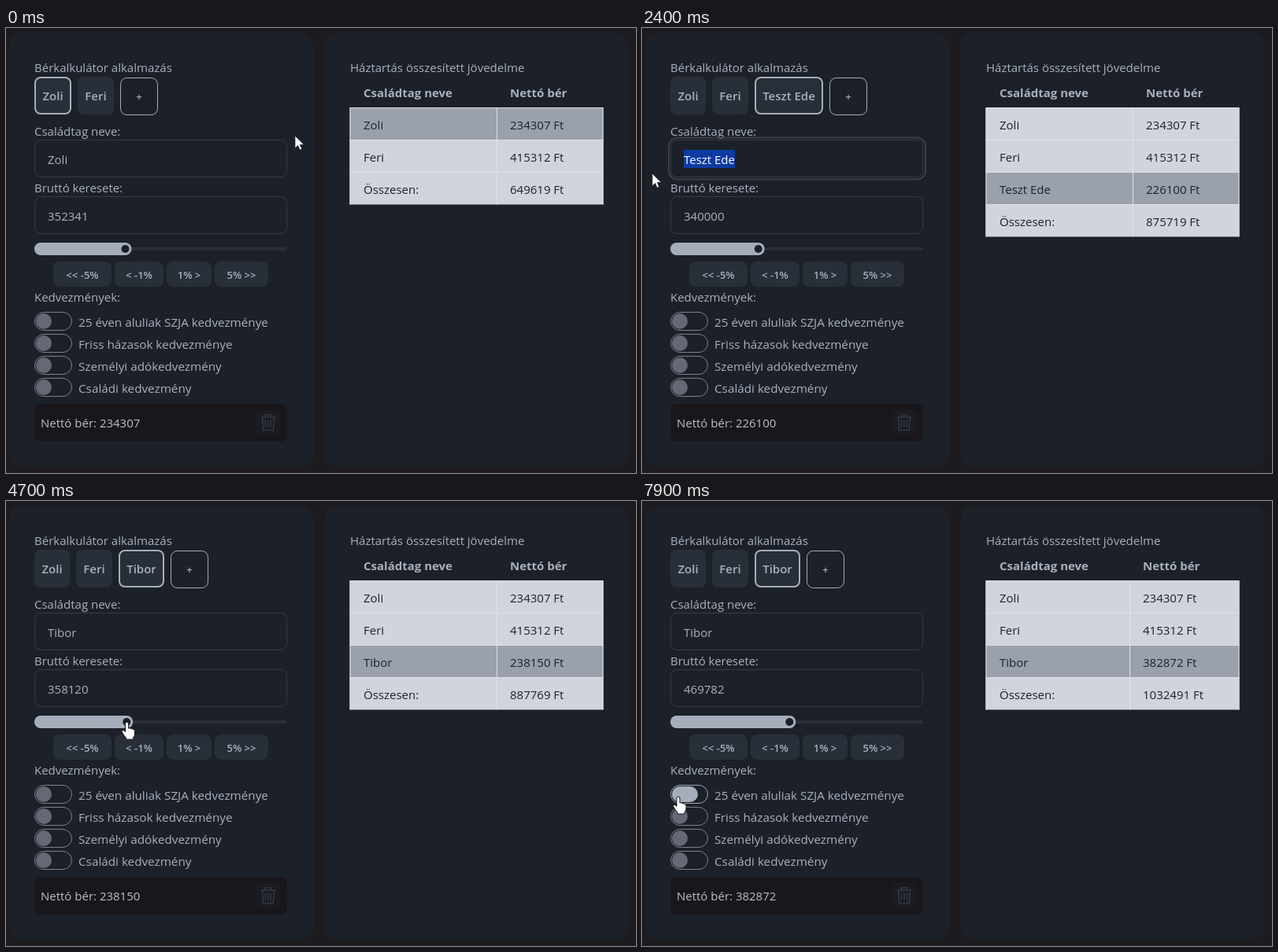
Animation, 800 px wide and 566 px high, one loop 8000 ms. Source, as an HTML page:

```html
<!DOCTYPE html>
<html lang="hu">
<head>
<meta charset="utf-8">
<title>Bérkalkulátor</title>
<style>
  html, body { margin: 0; width: 100%; height: 100%; overflow: hidden; background: #1c1c20; }
  svg { display: block; width: 800px; height: 566px; }
  text { font: 15px "Open Sans", "Noto Sans", sans-serif; fill: #a9b0be; white-space: pre; }
  .semi { font-weight: 600; }
  .bold { font-weight: 700; }
  .small { font-size: 13.1px; font-weight: 600; }
  .option { font-size: 15.25px; }
  .mid { text-anchor: middle; }
  .dark { fill: #1d232a; }
  .light { fill: #bcbfc7; }
</style>
</head>
<body>
<svg id="stage" viewBox="0 0 800 566"></svg>
<script>
const LOOP = 8000, TICK = 100;
const INK = '#a6adbb', BASE = '#1c2129', BUTTON = '#292f38', HOVER = '#232731', EDGE = '#363c45';
const stage = document.getElementById('stage');
const ruler = document.createElement('canvas').getContext('2d');

const ADD = 700, FOCUS = 1400, GRAB = 4600, DROP = 5000, TOGGLE = 7900;
const keyTimes = [2600, 2800, 3000, 3200, 3300];
const raiseTimes = [5400, 5800, 6200];
const sampleName = 'Teszt Ede', typedName = 'Tibor';

// time, x, y of the pointer tip
const path = [
  [0, 367, 137], [100, 367, 137], [500, 169, 88], [900, 169, 88], [1300, 135, 168],
  [1400, 135, 168], [1800, 13, 185], [3600, 13, 185], [3900, 97, 259], [4200, 148, 281],
  [4600, 148, 281], [5000, 183, 282], [5300, 213, 322], [5500, 213, 322], [5900, 220, 316],
  [7200, 220, 316], [7700, 46, 376], [8000, 46, 376]
];

const clamp = v => Math.max(0, Math.min(1, v));
const lerp = (a, b, k) => a + (b - a) * k;
const smooth = k => k * k * (3 - 2 * k);
const escape = s => String(s).replace(/</g, '&lt;').replace(/>/g, '&gt;');

function width(s, weight = 400) {
  ruler.font = `${weight} 15px "Open Sans", "Noto Sans", sans-serif`;
  return ruler.measureText(s).width;
}

const text = (x, y, s, cls = '', extra = '') =>
  `<text x="${x}" y="${y}" class="${cls}" ${extra}>${escape(s)}</text>`;
const rect = (x, y, w, h, r, fill, extra = '') =>
  `<rect x="${x}" y="${y}" width="${w}" height="${h}" rx="${r}" fill="${fill}" ${extra}/>`;
const line = (d, color, w = 1) =>
  `<path d="${d}" fill="none" stroke="${color}" stroke-width="${w}"/>`;
const inside = (p, x, y, w, h) => p.x >= x && p.x <= x + w && p.y >= y && p.y <= y + h;

function pointerAt(t) {
  const i = path.findIndex((p, n) => n && t <= p[0]);
  const [a, b] = [path[i - 1], path[i]];
  const k = smooth((t - a[0]) / (b[0] - a[0]));
  return { x: lerp(a[1], b[1], k), y: lerp(a[2], b[2], k) };
}

function grossAt(t) {
  if (t < ADD) return 352341;
  const dragged = lerp(340000, 455966, smooth(clamp((t - GRAB) / (DROP - GRAB))));
  return raiseTimes.filter(r => t >= r).reduce(v => Math.round(v * 1.01), Math.round(dragged));
}

function nameAt(t) {
  if (t < ADD) return 'Zoli';
  const typed = keyTimes.filter(k => t >= k).length;
  return typed ? typedName.slice(0, typed) : sampleName;
}

function tabs(names, active, p, t) {
  let x = 36, out = '';
  names.forEach((name, i) => {
    const on = i === active;
    const w = Math.ceil(width(name, 600)) + (on ? 20 : 18);
    const hot = t < 1200 && inside(p, x, 62, w, 48);
    const pop = on && t === 800 ? 1.02 : 1;
    const box = on
      ? rect(x + 1, 63, w - 2, 46, 7, hot ? '#262b34' : BUTTON, `stroke="${INK}" stroke-width="2"`)
      : rect(x, 62, w, 48, 8, BUTTON);
    const cx = x + w / 2;
    out += `<g transform="translate(${cx} 86) scale(${pop}) translate(${-cx} -86)">` +
      box + text(cx, 92, name, 'semi mid') + '</g>';
    x += w + 8;
  });
  const glow = t < ADD ? clamp((t - 300) / 200) : t < 800 ? 0.9 : t < 900 ? 0.25 : 0;
  out += rect(x + .5, 63.5, 47, 47, 8, INK, `fill-opacity="${glow}" stroke="${INK}"`);
  return out + text(x + 24, 92, '+', 'small mid', glow > .5 ? `style="fill:${BASE}"` : '');
}

function nameField(name, p, t) {
  const focused = t >= FOCUS && t < GRAB;
  let out = rect(36.5, 142.5, 320, 47, 8, 'none', `stroke="${EDGE}"`);
  if (focused) out += rect(34, 139.5, 326, 53, 11, 'none', 'stroke="#3a4049" stroke-width="2"');
  let cut = name.length;
  if (focused && t < keyTimes[0]) {
    while (cut && 53 + width(name.slice(0, cut)) - 4 > p.x) cut--;
  }
  const before = width(name.slice(0, cut));
  if (cut < name.length) out += rect(53 + before, 155, width(name) - before, 23, 0, '#0c3ba3');
  out += `<text x="53" y="173">${name.slice(0, cut)}<tspan fill="#fff">${name.slice(cut)}</tspan></text>`;
  const lastKey = keyTimes.filter(k => t >= k).pop();
  if (focused && lastKey && (t - lastKey) % 1000 < 500) out += rect(53 + before, 157, 1, 19, 0, INK);
  return out;
}

function grossField(gross, p) {
  let out = rect(36.5, 214.5, 320, 47, 8, 'none', `stroke="${EDGE}"`) + text(53, 245, gross);
  if (inside(p, 36, 214, 321, 48)) {
    out += '<path d="M342 215H349Q357 215 357 223V254Q357 262 349 262H342Z" fill="#3d3d3d"/>' +
      '<path d="M342.5 229L349 222L355.5 229ZM342.5 248L349 255L355.5 248Z" fill="#fff"/>';
  }
  return out;
}

function slider(gross) {
  const x = 44 + 305 * gross / 1e6;
  return rect(36, 279, 321, 4, 2, '#2a3038') + rect(36, 273, x - 28, 16, 8, INK) +
    `<circle cx="${x}" cy="281" r="5" fill="${BASE}"/>`;
}

function stepButtons(p) {
  return [[60, 74, '<< -5%'], [138, 62, '< -1%'], [204, 57, '1% >'], [265, 68, '5% >>']]
    .map(([x, w, s]) => rect(x, 297, w, 32, 8, inside(p, x, 297, w, 32) ? HOVER : BUTTON) +
      text(x + w / 2, 319, s, 'small mid')).join('');
}

function toggles(t) {
  return ['25 éven aluliak SZJA kedvezménye', 'Friss házasok kedvezménye',
    'Személyi adókedvezmény', 'Családi kedvezmény'].map((s, i) => {
    const y = 373 + 28 * i, on = !i && t >= TOGGLE;
    return rect(36.5, y - 11.5, 47, 23, 11.5, BASE, `stroke="${on ? '#a0a6b3' : '#7b808b'}"`) +
      rect(38, y - 10, on ? 33 : 20, 20, 10, on ? INK : '#656875') + text(92, y + 7, s, 'option');
  }).join('');
}

function netBar(net) {
  return rect(36, 478, 321, 48, 8, '#19171b') + text(44, 508, 'Nettó bér: ' + net, 'light') +
    rect(317, 486, 32, 32, 8, '#1b1b21') +
    line('M323.5 495H342.5M329 495V492H337V495M325.5 495L326.5 511.5H339.5L340.5 495' +
      'M329.5 498.5V508M333 498.5V508M336.5 498.5V508', '#333a44', 1.5);
}

function table(rows, active) {
  const left = 436.5, right = 758.5, top = 101.5, rowHeight = 41;
  const total = rows.reduce((sum, r) => sum + r[1], 0);
  const col = total >= 1e6 ? 620 : 624;
  const all = [...rows, ['Összesen:', total]], bottom = top + rowHeight * all.length;
  let out = text(454, 88, 'Családtag neve', 'bold') + text(col + 16, 88, 'Nettó bér', 'bold');
  all.forEach(([name, net], i) => {
    const y = top + rowHeight * i;
    out += rect(left, y, right - left, rowHeight, 0, i === active ? '#9ba1ac' : '#d1d4dc') +
      line(`M${left} ${y}H${right}`, '#dcdfe5') +
      text(454, y + 27.5, name, 'dark') + text(col + 16, y + 27.5, net + ' Ft', 'dark');
  });
  return out + line(`M${col - .5} ${top}V${bottom}M${left + .5} ${top}V${bottom}` +
    `M${right - .5} ${top}V${bottom}`, '#dfe2e8');
}

function pointer(p, t, tabsEnd) {
  const dragging = t >= GRAB && t <= DROP;
  const hand = dragging || inside(p, 36, 62, tabsEnd - 36, 48) || inside(p, 36, 273, 321, 16) ||
    inside(p, 60, 297, 273, 32) || inside(p, 36, 361, 48, 109);
  const beam = inside(p, 36, 142, 321, 48) || inside(p, 36, 214, 321, 48);
  const at = `transform="translate(${p.x} ${p.y})"`;
  if (hand) {
    return `<path ${at} d="M-2 2Q-2 0 0 0Q2 0 2 2V8Q4 7 5 8.5Q7 8 8 9.5Q10 9 10 11.5V15Q10 18 8 20V22H-1V20` +
      'Q-3 18 -6 13Q-7 11 -5.5 10.5Q-4 10 -2 12.5Z" fill="#fff" stroke="#15171b"/>';
  }
  if (beam) {
    return `<path ${at} d="M-4 -7.5H-1L0 -6.5L1 -7.5H4M0 -6.5V6.5M-4 7.5H-1L0 6.5L1 7.5H4" fill="none" stroke="#e4e6ea" stroke-width="1.3"/>`;
  }
  return `<path ${at} d="M0 0V16L3.7 12.5L6.2 18.2L8.8 17L6.3 11.5H11.3Z" fill="#fff" stroke="#15171b" stroke-width=".7"/>`;
}

function render(t) {
  const p = pointerAt(t), gross = grossAt(t), name = nameAt(t);
  const net = Math.round(gross * (t >= TOGGLE ? .815 : .665));
  const rows = [['Zoli', 234307], ['Feri', 415312]];
  if (t >= ADD) rows.push([name, net]);
  const active = t < ADD ? 0 : 2;
  stage.innerHTML =
    rect(4, 6, 386, 552, 16, BASE) + rect(405, 6, 386, 552, 16, BASE) +
    text(36, 56, 'Bérkalkulátor alkalmazás') + text(437, 56, 'Háztartás összesített jövedelme') +
    text(36, 137, 'Családtag neve:') + text(36, 209, 'Bruttó keresete:') +
    text(36, 348, 'Kedvezmények:') +
    tabs(rows.map(r => r[0]), active, p, t) + nameField(name, p, t) + grossField(gross, p) +
    slider(gross) + stepButtons(p) + toggles(t) + netBar(net) + table(rows, active) +
    pointer(p, t, t < ADD ? 193 : 284);
}

const start = performance.now();
let shown = -1;
function frame(now) {
  const t = Math.floor(Math.max(0, now - start) % LOOP / TICK) * TICK;
  if (t !== shown) render(shown = t);
  requestAnimationFrame(frame);
}
render(0);
requestAnimationFrame(frame);
</script>
</body>
</html>
```
